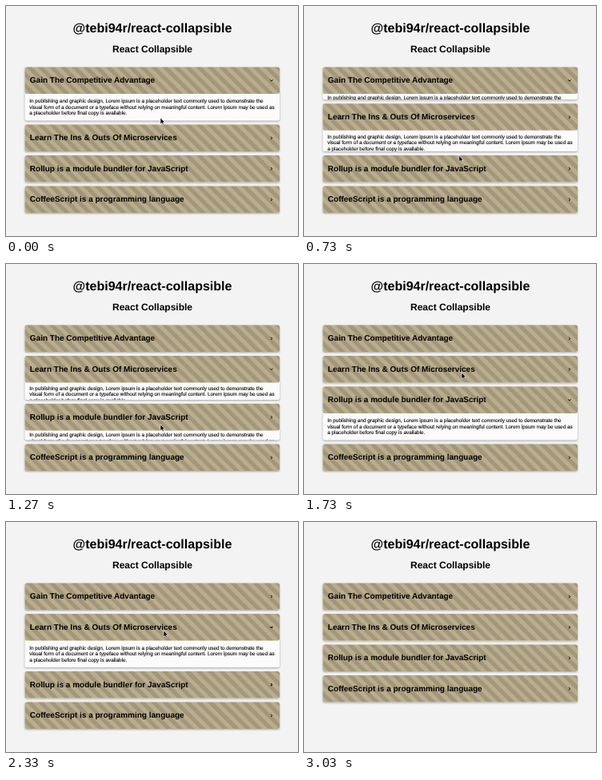
An HTML page that plays this animation: 365x288 px, repeating every 3.53 s.

```html
<!DOCTYPE html>
<html lang="en">
<head>
<meta charset="utf-8">
<title>React Collapsible</title>
<style>
  html, body { margin: 0; width: 100%; height: 100%; overflow: hidden; background: #f3f3f3; }
  svg { display: block; }
  text { font-family: "Liberation Sans", Arial, sans-serif; text-rendering: geometricPrecision; }
  .title, .label { font-weight: bold; }
  .title { text-anchor: middle; }
  .label { font-size: 10px; }
  .copy { font-size: 6.4px; stroke: #000; stroke-width: .1; }
  .card { fill: #fbfbfc; filter: drop-shadow(0 1px 1.3px rgba(0, 0, 0, .32)); }
  .chevron { fill: none; stroke: #000; stroke-width: 1; }
</style>
</head>
<body>
<svg id="stage" width="365" height="288" viewBox="0 0 365 288">
  <defs>
    <!-- Diagonal bands of two shade strengths, starting at the bottom left corner -->
    <pattern id="stripes" width="10" height="10" patternUnits="userSpaceOnUse"
             patternTransform="translate(0 33.5) rotate(-45)">
      <rect width="5.02" height="10" fill="#000" opacity=".2"/>
      <rect x="5" width="5" height="10" fill="#000" opacity=".3"/>
    </pattern>
  </defs>
  <rect width="365" height="288" fill="#f3f3f3"/>
  <text class="title" x="183" y="32.8" font-size="16">@tebi94r/react-collapsible</text>
  <text class="title" x="183" y="58.2" font-size="12">React Collapsible</text>
  <g id="list"></g>
  <path id="cursor" d="M0 0V7.8L1.8 6.2L3 8.9L4.3 8.3L3.1 5.7H5.5Z"
        fill="#000" stroke="#fff" stroke-width=".6"/>
</svg>
<script>
  const LOOP = 3530;
  const LEFT = 23.5, TOP = 76.5, WIDTH = 318.5, HEADER = 33.5, PANEL = 33.5, GAP = 5;
  const PADDING = 5.4;
  const SLIDE = 200, TURN = 100;

  const labels = [
    "Gain The Competitive Advantage",
    "Learn The Ins & Outs Of Microservices",
    "Rollup is a module bundler for JavaScript",
    "CoffeeScript is a programming language"
  ];
  const copy = [
    "In publishing and graphic design, Lorem ipsum is a placeholder text commonly used to demonstrate the",
    "visual form of a document or a typeface without relying on meaningful content. Lorem ipsum may be used as",
    "a placeholder before final copy is available."
  ];

  const clicks = [
    { at: 575, close: 0, open: 1 },
    { at: 1200, close: 1, open: 2 },
    { at: 2050, close: 2, open: 1 },
    { at: 2450, close: 1 }
  ];

  // time, x, y
  const pointer = [
    [0, 193, 140], [30, 193, 140], [200, 192.5, 166], [370, 192.5, 166], [500, 192, 168],
    [620, 192, 168], [820, 195, 201], [900, 195, 201], [1100, 193, 201], [1285, 193, 201],
    [1430, 193, 174], [1700, 197, 136], [2600, 197, 136], [2790, 200, 9]
  ];
  const POINTER_GONE = 2790;

  const el = (tag, attrs, parent, text) => {
    const node = document.createElementNS("http://www.w3.org/2000/svg", tag);
    for (const key in attrs) node.setAttribute(key, attrs[key]);
    if (text) node.textContent = text;
    return parent.appendChild(node);
  };
  const clamp = v => Math.max(0, Math.min(1, v));
  const smooth = v => v * v * (3 - 2 * v);

  const list = document.getElementById("list");
  const cursor = document.getElementById("cursor");

  const items = labels.map(label => {
    const group = el("g", {}, list);
    const card = el("rect", { class: "card", width: WIDTH, rx: 2.5 }, group);
    for (const fill of ["#e8d8b0", "url(#stripes)"])
      el("rect", { width: WIDTH, height: HEADER, rx: 2.5, fill }, group);
    el("text", { class: "label", x: 6.3, y: 19.9 }, group, label);
    const chevron = el("path", { class: "chevron", d: "M-.8 -1.7L.7 0L-.8 1.7" }, group);
    const panel = el("svg", { y: HEADER, width: WIDTH, height: 0, overflow: "hidden" }, group);
    const body = el("g", {}, panel);
    copy.forEach((line, i) => el("text", { class: "copy", x: 5.7, y: 11.3 + i * 7.4 }, body, line));
    return { group, card, chevron, panel, body };
  });

  function openness(index, t, delay, duration) {
    let value = index === 0 ? 1 : 0;
    for (const click of clicks) {
      const p = clamp((t - click.at - delay) / duration);
      if (click.open === index) value += p;
      if (click.close === index) value -= p;
    }
    return clamp(value);
  }

  function pointerAt(t) {
    const next = pointer.findIndex(key => key[0] > t);
    if (next < 0) return pointer[pointer.length - 1].slice(1);
    const [t0, x0, y0] = pointer[next - 1], [t1, x1, y1] = pointer[next];
    const p = smooth((t - t0) / (t1 - t0));
    return [x0 + (x1 - x0) * p, y0 + (y1 - y0) * p];
  }

  function render(t) {
    let y = TOP;
    items.forEach((item, i) => {
      const open = openness(i, t, 0, SLIDE);
      const turn = smooth(openness(i, t, SLIDE, TURN));
      const height = PANEL * open;
      item.group.setAttribute("transform", `translate(${LEFT} ${y})`);
      item.card.setAttribute("height", HEADER + height);
      item.panel.setAttribute("height", height);
      item.body.setAttribute("transform", `translate(0 ${PADDING * (open - 1)})`);
      item.chevron.setAttribute("transform", `translate(308.4 16.8) rotate(${90 * turn})`);
      y += HEADER + height + GAP;
    });
    const [px, py] = pointerAt(t);
    cursor.setAttribute("transform", `translate(${px} ${py})`);
    cursor.setAttribute("visibility", t < POINTER_GONE ? "visible" : "hidden");
  }

  const start = performance.now();
  function tick() {
    render((performance.now() - start) % LOOP);
    requestAnimationFrame(tick);
  }
  tick();
</script>
</body>
</html>
```
